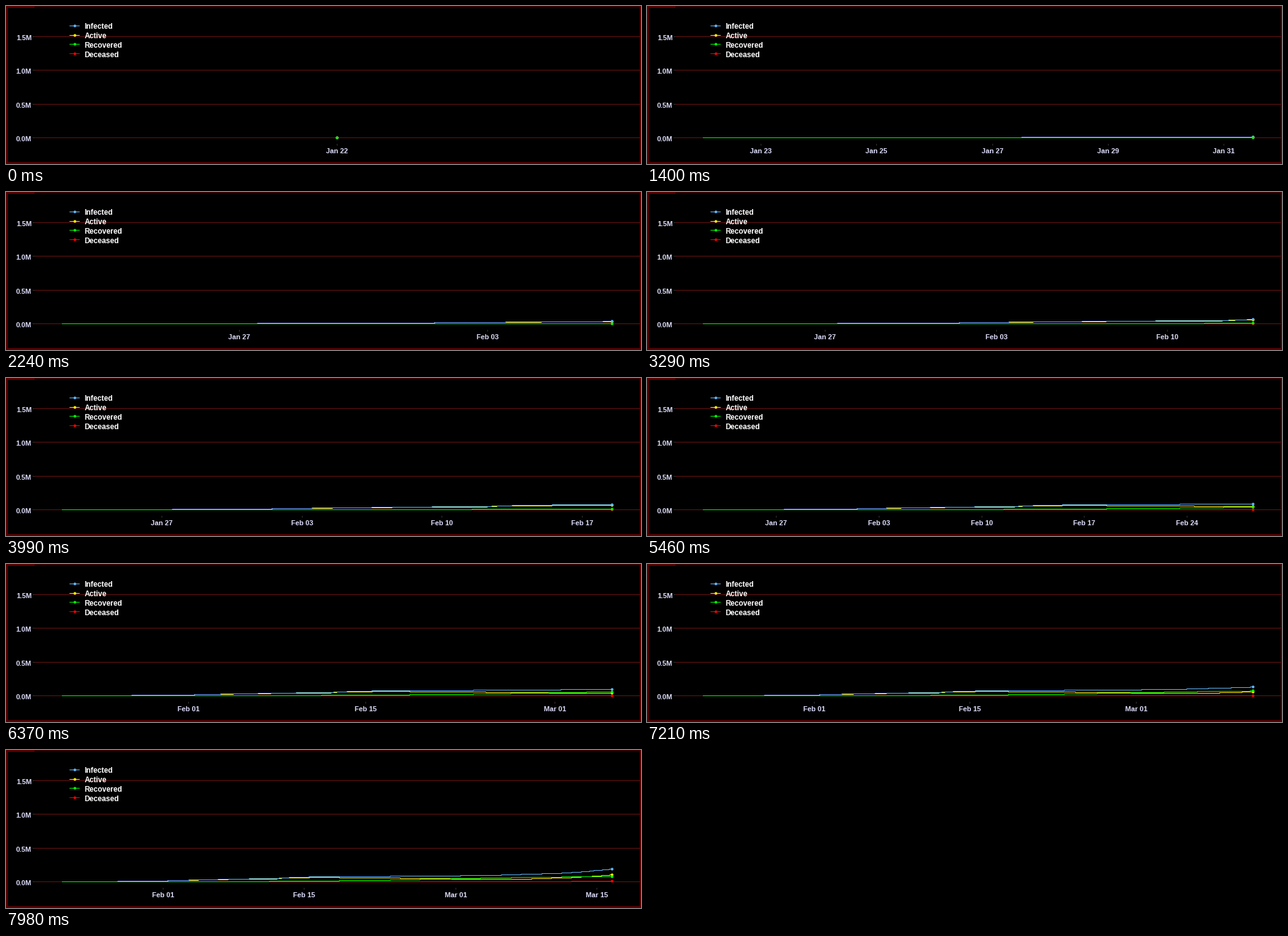
Recreate the animation shown at these times as a matplotlib script. Size 1000 by 250 pixels, loop 8 s.

```python
import numpy as np
import matplotlib.pyplot as plt
from matplotlib.animation import FuncAnimation
from matplotlib.patches import Circle, Rectangle

W, H, DPI = 1000, 250, 100
LOOP_MS, TICK_MS, STEP_MS = 8000, 20, 70
LEFT, SPAN, MIDDLE, ZERO_ROW = 88, 866, 521, 208
PX_PER_K = 0.1066          # pixels per thousand cases
STEPS_PER_DAY = 2.0875

BORDER, GRID, TICK, LABEL = "#5a0000", "#6a1410", "#333333", "#dcdcfa"
COLORS = {"Infected": "#63b8ff", "Active": "#ffff00",
          "Recovered": "#00ff00", "Deceased": "#ff0000"}
DRAW_ORDER = sorted(COLORS)

days = np.arange(57)
day_steps = np.round(days * STEPS_PER_DAY)


def logistic(total, rate, middle):
    return total / (1 + np.exp(-rate * (days - middle)))


# Thousands per day: first wave, a sudden recount, then the second wave
recount = np.where(days > 21, 26 * (1 - np.exp((20.4 - days) / 2.4)), 0)
infected = logistic(50, .3, 13.2) + recount + 13.3 * np.exp(.147 * (days - 40))
recovered = logistic(83, .155, 38.25)
deceased = .445 * np.exp(.047 * days)
series = {"Infected": infected, "Active": infected - recovered - deceased,
          "Recovered": recovered, "Deceased": deceased}

fig = plt.figure(figsize=(W / DPI, H / DPI), dpi=DPI, facecolor="black")
ax = fig.add_axes([0, 0, 1, 1])
ax.set(xlim=(0, W), ylim=(H, 0))
ax.axis("off")


def box(x0, y0, x1, y1, color, z):
    ax.add_patch(Rectangle((x0, y0), x1 - x0, y1 - y0, color=color, lw=0,
                           antialiased=False, zorder=z))


def stroke(xs, ys, color, z):
    """One pixel line through pixel centres, stepping between rows."""
    line, = ax.plot(np.add(xs, .5), np.add(ys, .5), color=color, lw=72 / DPI,
                    drawstyle="steps-mid", snap=False, zorder=z)
    return line


def dot(x, y, color, z):
    return ax.add_patch(Circle((x + .5, y + .5), 2.1, color=color, lw=0,
                               snap=False, zorder=z))


def text(x, y, s, color, px, ha):
    return ax.text(x, y, s, color=color, fontsize=px * 72 / DPI, ha=ha,
                   va="baseline", family="Liberation Sans", weight="bold",
                   zorder=9)


# Frame, panel and value axis
box(0, 0, W, H, BORDER, 0)
box(3, 3, 998, 247, "black", 1)
box(45, 1, 998, 218, "black", 1)
for i in range(4):
    row = round(ZERO_ROW - i * 500 * PX_PER_K)
    box(45, row, 998, row + 1, GRID, 2)
    box(42, row, 45, row + 1, TICK, 2)
    text(40.3, row + 6, f"{i / 2:.1f}M", LABEL, 11, "right")

# Legend
for i, (name, color) in enumerate(COLORS.items()):
    row = round(31 + 14.7 * i)
    box(100, row, 116, row + 1, color, 4)
    dot(108, row, color, 5)
    text(123.5, 36 + 15 * i, name, "white", 11.6, "left")

lines = {n: stroke([], [], COLORS[n], 5 + i / 10)
         for i, n in enumerate(DRAW_ORDER)}
dots = {n: dot(0, 0, COLORS[n], 6 + i / 10) for i, n in enumerate(DRAW_ORDER)}
ticks = [(stroke([0, 0], [218, 220], TICK, 2),
          text(0, 233, "", LABEL, 11, "center")) for _ in range(9)]


def to_x(day, end):
    if end == 0:
        return np.full(np.shape(day), MIDDLE)
    return np.round(LEFT + SPAN * np.asarray(day) / end)


def date_breaks(end):
    if end < 5:
        marks = days
    elif end <= 12:
        marks = days[1::2]
    elif end <= 38:
        marks = days[5::7]
    else:
        marks = np.array([10, 24, 39, 53])   # 1st and 15th of each month
    return marks[marks <= 1.05 * end]


def date_name(day):
    _, month, dom = str(np.datetime64("2020-01-22") + int(day)).split("-")
    return f"{('Jan', 'Feb', 'Mar')[int(month) - 1]} {dom}"


def update(i):
    step = (i * TICK_MS + TICK_MS // 2) // STEP_MS
    end = np.interp(step, day_steps, days)
    shown = np.append(days[days < end], end)
    xs = to_x(shown, end)
    columns = np.arange(xs[0], xs[-1] + 1)
    for name in DRAW_ORDER:
        values = np.interp(shown, days, series[name])
        rows = ZERO_ROW - np.round(values * PX_PER_K)
        path = np.round(np.interp(columns, xs, rows))
        lines[name].set_data(columns + .5, path + .5)
        dots[name].center = xs[-1] + .5, rows[-1] + .5

    marks = date_breaks(end)
    for j, (mark, label) in enumerate(ticks):
        visible = j < len(marks)
        mark.set_visible(visible)
        label.set_visible(visible)
        if visible:
            x = float(to_x(marks[j], end)) + .5
            mark.set_xdata([x, x])
            label.set_x(x)
            label.set_text(date_name(marks[j]))
    return []


anim = FuncAnimation(fig, update, frames=LOOP_MS // TICK_MS,
                     interval=TICK_MS, repeat=True, repeat_delay=0)
plt.show()
```
